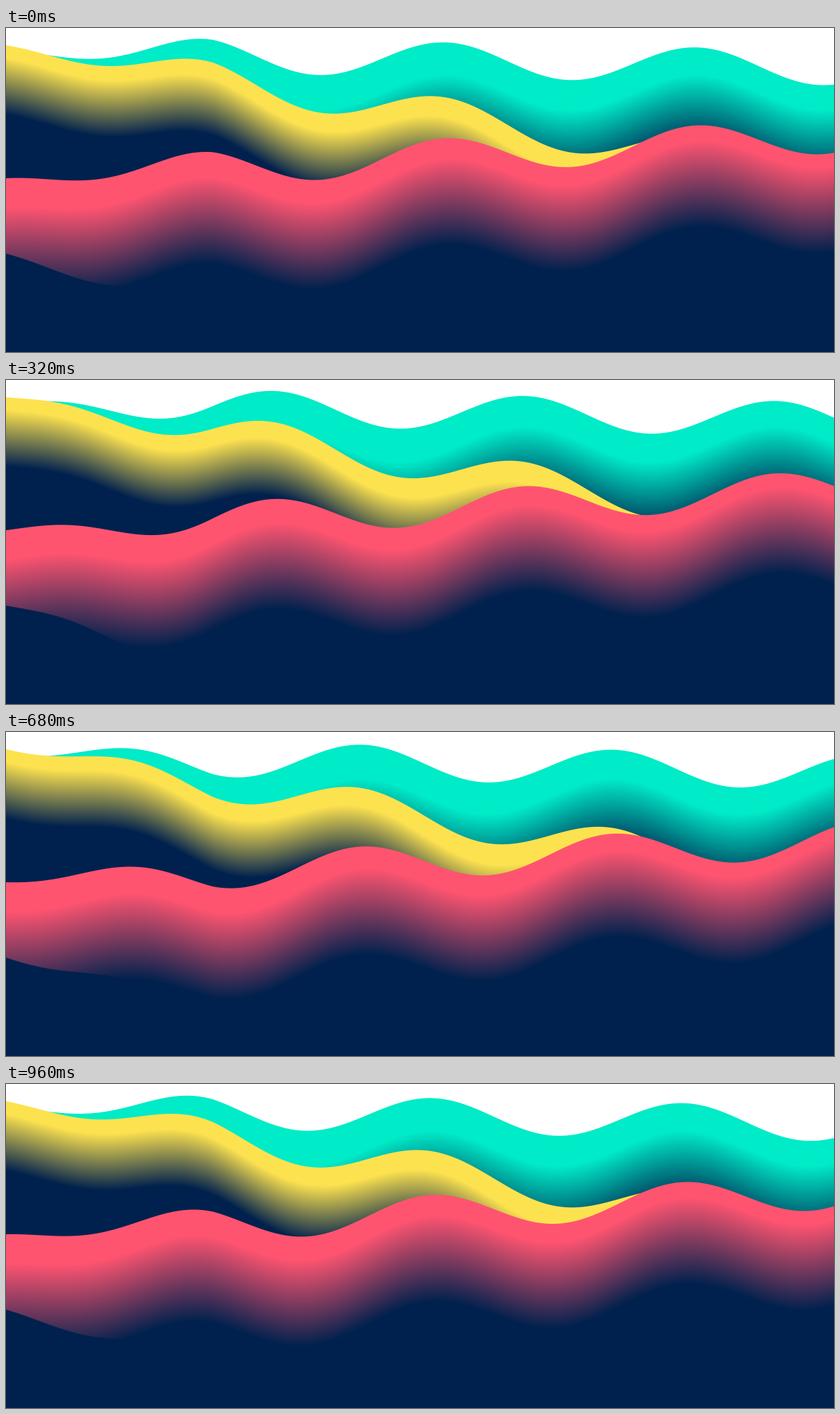
Recreate the animation shown at these times as an HTML page with a canvas. Size 1197 px wide and 468 px high, loop 1000 ms.

```html
<!DOCTYPE html>
<html lang="en">
<head>
<meta charset="utf-8">
<title>Waves</title>
<style>
  html, body { margin: 0; width: 100%; height: 100%; overflow: hidden; background: #fff; }
  canvas { display: block; }
</style>
</head>
<body>
<canvas id="stage" width="1197" height="468"></canvas>
<script>
const W = 1197, H = 468;
const LOOP = 1000, STEP = 40;
const AMP = 25.4, WAVELENGTH = 363.5, CREST = 634.2, RAMP = W / 4;
const NAVY = '#00214d';
const ctx = document.getElementById('stage').getContext('2d');

// Back to front. y0 and slope give the resting line; the shade runs to navy
// between depths from and to, drifting by drift per pixel of x.
const layers = [
  { color: '#00ebc7', y0: 33.5, slope: 0.02, from: 60, to: 165, drift: -0.02 },
  { color: '#fde24f', y0: 25, slope: 0.1585, from: 18, to: 100, drift: 0.017 },
  { color: '#ff5470', y0: 217, slope: -0.051, from: 42, to: 167, drift: -0.02 },
  { color: NAVY, y0: 326, slope: 0.262, from: 0, to: 1, drift: 0 }
];

for (const layer of layers) {
  layer.fill = ctx.createLinearGradient(0, layer.from, 0, layer.to);
  layer.fill.addColorStop(0, layer.color);
  layer.fill.addColorStop(1, NAVY);
}

// Distance travelled to the right at given times: [ms, px]
const travel = [[0, 0], [200, 73], [320, 115], [480, 169.5], [680, 243],
  [800, 290.5], [960, 344.5], [LOOP, WAVELENGTH]];

function shiftAt(t) {
  const i = travel.findIndex(p => p[0] > t);
  const [t0, a] = travel[i - 1], [t1, b] = travel[i];
  return a + (b - a) * (t - t0) / (t1 - t0);
}

function swell(x, shift) {
  const grow = Math.min(1, x / RAMP);
  return -AMP * grow * Math.cos(2 * Math.PI * (x - CREST - shift) / WAVELENGTH);
}

function draw(t) {
  const shift = shiftAt(t);
  const wave = Array.from({ length: W }, (_, x) => swell(x + 0.5, shift));
  ctx.setTransform(1, 0, 0, 1, 0, 0);
  ctx.fillStyle = '#fff';
  ctx.fillRect(0, 0, W, H);
  for (const { y0, slope, drift, fill } of layers) {
    ctx.fillStyle = fill;
    for (let x = 0; x < W; x++) {
      const slide = drift * x;
      ctx.setTransform(1, 0, 0, 1, x, y0 + slope * x + wave[x] + slide);
      ctx.fillRect(0, -slide, 1, H);
    }
  }
}

let last = -1;
function tick() {
  const t = Math.floor(performance.now() % LOOP / STEP) * STEP;
  if (t !== last) draw(last = t);
  requestAnimationFrame(tick);
}
tick();
</script>
</body>
</html>
```
